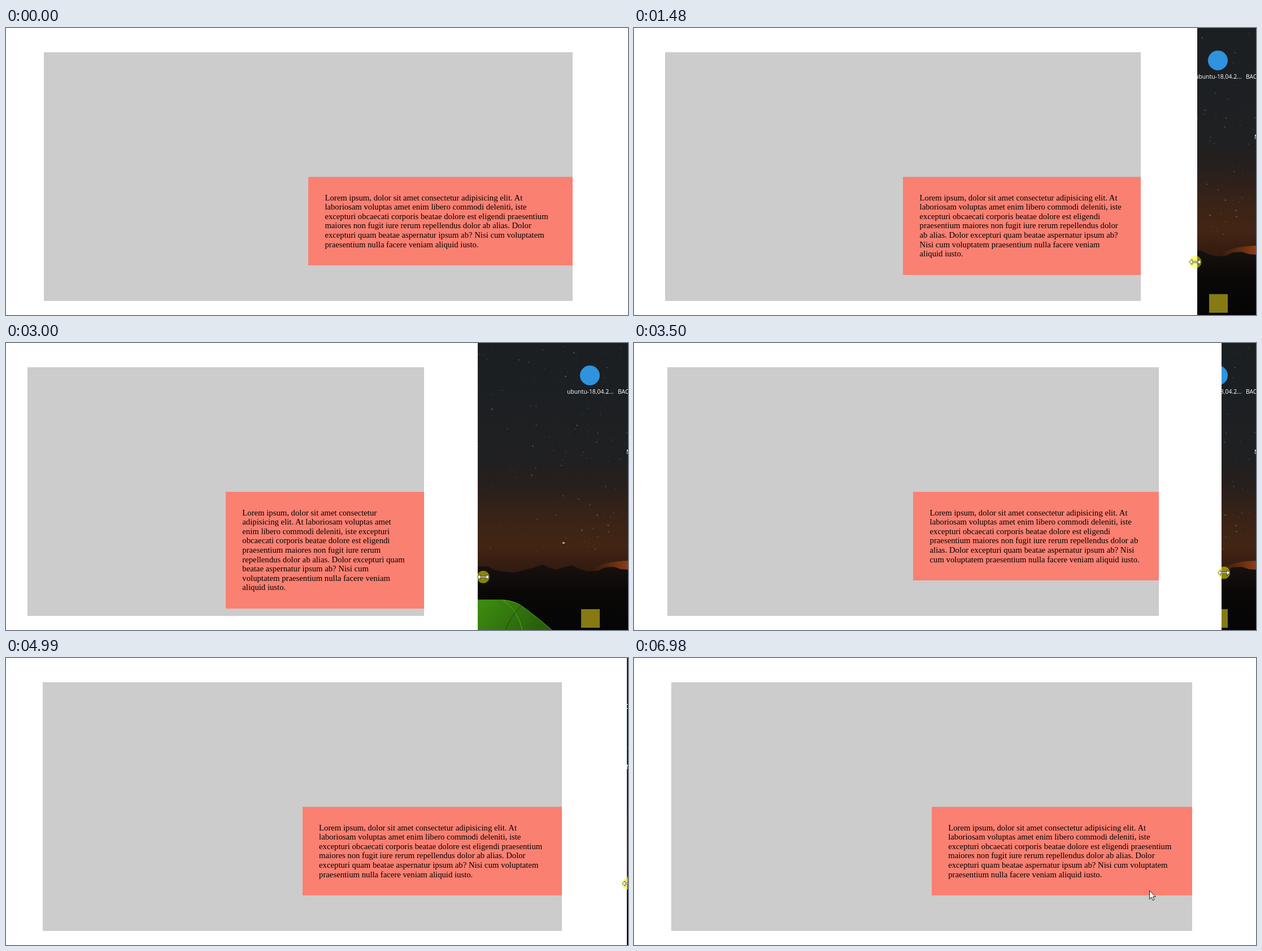
Write an HTML page that moves like this. It is 1101 by 509 pixels and loops after 8 s.

```html
<!DOCTYPE html>
<html lang="en">
<head>
<meta charset="utf-8">
<title>Responsive box</title>
<style>
  html, body { margin: 0; width: 100%; height: 100%; overflow: hidden; background: #fff; }
  #stage { position: relative; width: 1101px; height: 509px; overflow: hidden; }
  svg { position: absolute; left: 0; top: 0; }
  #page { position: absolute; left: 0; top: 0; height: 509px; overflow: hidden; background: #fff; }
  #panel { position: absolute; top: 43px; height: 441px; background: #ccc; }
  #card {
    position: absolute; top: 263.5px; box-sizing: border-box; padding: 29.3px 29.4px;
    background: #fa8072; color: #000;
    font: 14.72px/16.56px "Liberation Serif", "Times New Roman", serif;
  }
  .label { font: 10.4px "Open Sans", "Noto Sans", sans-serif; fill: #fff; }
</style>
</head>
<body>
<div id="stage">
  <svg width="1101" height="509" viewBox="0 0 1101 509">
    <defs>
      <linearGradient id="sky" x1="0" y1="0" x2="0" y2="400" gradientUnits="userSpaceOnUse">
        <stop offset="0" stop-color="#1a1f22"/>
        <stop offset=".5" stop-color="#1f2022"/>
        <stop offset=".62" stop-color="#261f1c"/>
        <stop offset=".78" stop-color="#3a2316"/>
        <stop offset=".9" stop-color="#432514"/>
        <stop offset="1" stop-color="#331b10"/>
      </linearGradient>
      <linearGradient id="glow" x1="1040" y1="0" x2="1101" y2="0" gradientUnits="userSpaceOnUse">
        <stop offset="0" stop-color="#85390f" stop-opacity="0"/>
        <stop offset="1" stop-color="#8c3e16"/>
      </linearGradient>
      <linearGradient id="land" x1="0" y1="395" x2="0" y2="509" gradientUnits="userSpaceOnUse">
        <stop offset="0" stop-color="#17110e"/>
        <stop offset=".4" stop-color="#0a0807"/>
        <stop offset="1" stop-color="#050505"/>
      </linearGradient>
      <linearGradient id="tent" x1="850" y1="455" x2="930" y2="520" gradientUnits="userSpaceOnUse">
        <stop offset="0" stop-color="#3c8a10"/>
        <stop offset="1" stop-color="#28600a"/>
      </linearGradient>
    </defs>
    <rect x="790" width="311" height="509" fill="url(#sky)"/>
    <g id="stars" stroke="#d9cfc2" stroke-width=".9" stroke-linecap="round"></g>
    <ellipse cx="987" cy="354.500" rx="2.300" ry="1.500" fill="#e0a878"/>
    <path d="M1040 398Q1065 387 1101 386V405H1040Z" fill="url(#glow)"/>
    <path d="M790 400L835 397 852 396 866 403 880 405 900 407 920 402 935 398 950 393 960 398 975 402 990 397 1002 394 1015 401 1030 405 1048 404 1060 398 1076 397 1088 401 1101 402V509H790Z" fill="url(#land)"/>
    <path d="M790 455H880Q902 457 918 470 945 490 966 509H790Z" fill="url(#tent)"/>
    <path d="M880 456Q906 474 914 509M880 456Q902 457 918 470 945 490 966 509" fill="none" stroke="#58a524"/>
    <path d="M912 466Q892 486 884 509" fill="none" stroke="#1d4a06"/>
    <circle cx="1033.500" cy="57.500" r="17.500" fill="#2f93de"/>
    <rect x="1018" y="472" width="33" height="33" fill="#857a14"/>
    <text class="label" x="993" y="90">ubuntu-18.04.2...</text>
    <text class="label" x="1083" y="90">BAC</text>
    <text class="label" x="1098" y="197">N</text>
  </svg>
  <div id="page">
    <div id="panel"></div>
    <div id="card">Lorem ipsum, dolor sit amet consectetur adipisicing elit. At laboriosam voluptas amet enim libero commodi deleniti, iste excepturi obcaecati corporis beatae dolore est eligendi praesentium maiores non fugit iure rerum repellendus dolor ab alias. Dolor excepturi quam beatae aspernatur ipsum ab? Nisi cum voluptatem praesentium nulla facere veniam aliquid iusto.</div>
  </div>
  <svg width="1101" height="509" viewBox="0 0 1101 509">
    <g id="resize">
      <circle r="11" fill="#ff0" fill-opacity=".5"/>
      <path d="M-10.500 0L-5.500 -4.800V-1.100H5.500V-4.800L10.500 0 5.500 4.800V1.100H-5.500V4.800Z" fill="#fff" stroke="#222" stroke-width=".8"/>
    </g>
    <path id="arrow" d="M.5 .5V15.700L4 12.400 6.300 17.800 8.800 16.700 6.500 11.500H11.200Z" fill="#fff" stroke="#000" stroke-width=".9"/>
  </svg>
</div>
<script>
  const LOOP = 8000, STEP = 500, JITTER = 20;   // the picture changes about twice a second
  const LEFT = -49.8, GRIP = 2, RELEASE = 13;

  // viewport width at each step of the drag, pointer height at each second
  const WIDTHS = [1169.6, 1158, 1105, 1052, 902.4, 858, 877.5, 1088, 1142.9, 1146.5, 1149, 1152, 1153.2];
  const HEIGHTS = [410, 410, 420, 415, 400, 400];

  const $ = id => document.getElementById(id);
  const page = $('page'), panel = $('panel'), card = $('card');
  const resize = $('resize'), arrow = $('arrow');

  const pick = (list, i) => list[Math.min(i, list.length - 1)];

  function lerpList(list, pos) {
    const i = Math.floor(pos), a = pick(list, i);
    return a + (pick(list, i + 1) - a) * (pos - i);
  }

  function addStars() {
    let seed = 7;
    const rnd = () => (seed = seed * 16807 % 2147483647) / 2147483647;
    for (let i = 0; i < 170; i++) {
      const star = document.createElementNS('http://www.w3.org/2000/svg', 'path');
      const x = 800 + rnd() * 300, y = rnd() * 375, len = .6 + rnd() * 1.6;
      star.setAttribute('d', `M${x} ${y}l${len} ${len / 2}`);
      star.setAttribute('opacity', .1 + .6 * rnd() ** 3);
      $('stars').appendChild(star);
    }
  }

  function span(el, x1, x2) {
    el.style.left = x1 + 'px';
    el.style.width = x2 - x1 + 'px';
  }

  function put(el, x, y, shown) {
    el.setAttribute('transform', `translate(${x} ${y})`);
    el.setAttribute('visibility', shown ? 'visible' : 'hidden');
  }

  function draw(t) {
    const step = Math.floor((t + JITTER) % LOOP / STEP);
    const view = pick(WIDTHS, step);
    // layout trails the window edge, which trails the pointer
    const lag = (pick(WIDTHS, step + 1) - view) / 28;
    const edge = LEFT + view + lag;
    const at = part => LEFT + view * part;

    page.style.width = Math.round(edge) + 'px';
    span(panel, at(.1), at(.9));
    span(card, at(.5), at(.9));

    const moved = step - RELEASE;
    put(resize, edge + lag + GRIP, lerpList(HEIGHTS, step / 2), moved < 0);
    put(arrow, 1091 - 179 * Math.min(moved, 1), 415 - 3 * Math.min(moved, 1), moved >= 0);
  }

  const begin = performance.now();
  function tick() {
    draw((performance.now() - begin) % LOOP);
    requestAnimationFrame(tick);
  }
  addStars();
  draw(0);
  requestAnimationFrame(tick);
</script>
</body>
</html>
```
